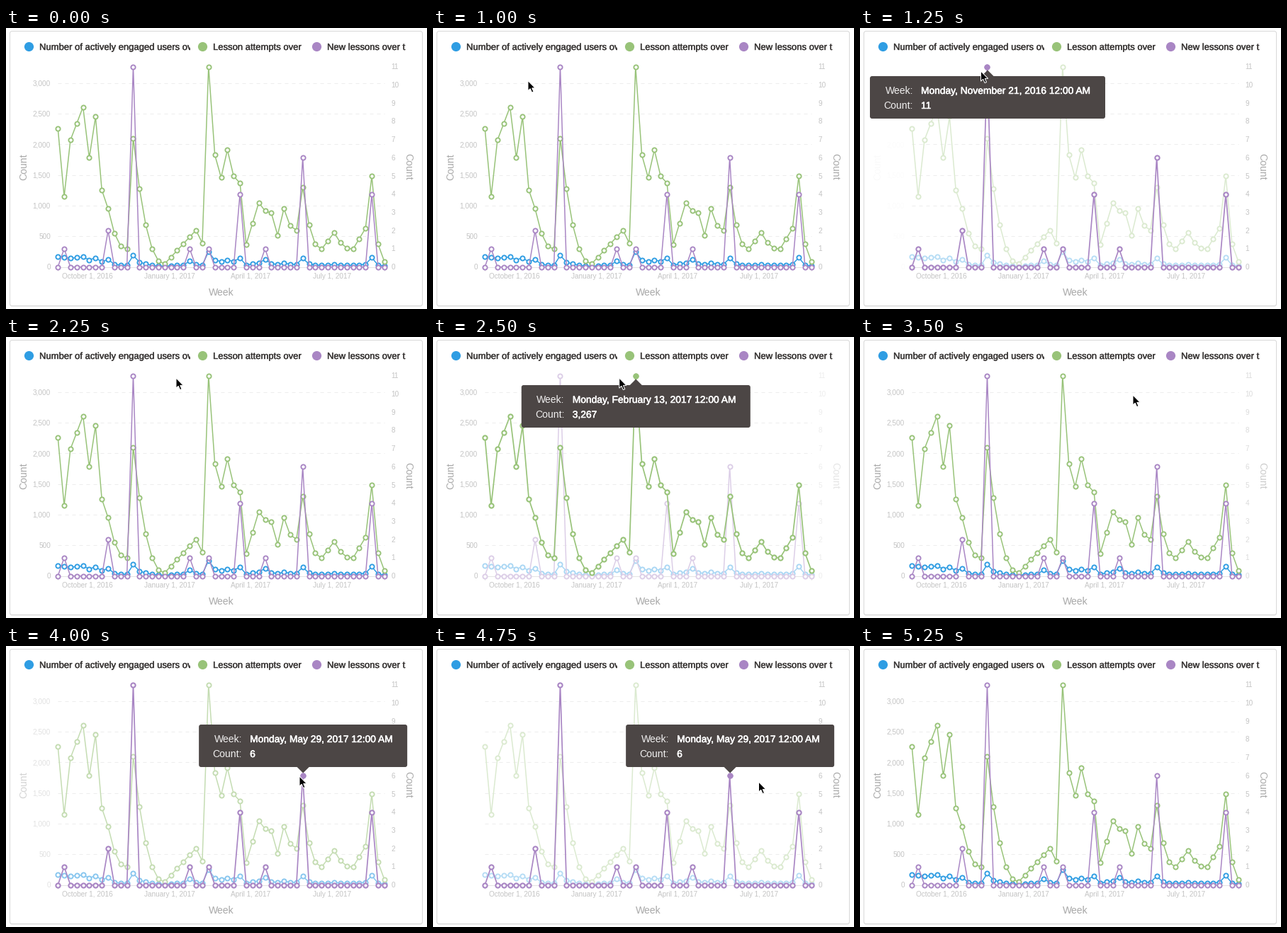
A matplotlib script for the animation above (5750 ms loop, 594 by 397 pixels).

```python
import numpy as np
import matplotlib.pyplot as plt
from matplotlib.animation import FuncAnimation
from matplotlib.patches import Circle, FancyBboxPatch, Polygon, Rectangle
from matplotlib.patheffects import withStroke

W, H, DPI = 594, 397, 64
PT = 72 / DPI
LEFT, RIGHT, BASE, TOP = 73.2, 533.8, 337.6, 54.7
WEEKS = 53
MAX_COUNT, MAX_NEW = 3267, 11

BLUE, GREEN, PURPLE = "#2f9de3", "#98c379", "#a986c4"
TEXT, TICK, TITLE, DARK = "#3a3736", "#c4c4c4", "#a9a9a9", "#4c4645"

# weeks with new lessons, and turning points of lesson attempts (in tens)
NEW = {1: 1, 8: 2, 12: 11, 21: 1, 24: 1, 29: 4, 33: 1, 39: 6, 50: 4}
TURNS = {0: 226, 1: 115, 2: 207, 4: 261, 5: 178, 6: 245, 8: 95, 11: 29,
         12: 210, 17: 5, 22: 60, 23: 39, 24: 326.7, 26: 146, 27: 191, 29: 137,
         30: 37, 32: 105, 34: 88, 35: 52, 36: 95, 38: 60, 39: 130, 42: 29,
         44: 56, 47: 29, 49: 63, 50: 148, 52: 9}

fig = plt.figure(figsize=(W / DPI, H / DPI), dpi=DPI, facecolor="white")
ax = fig.add_axes([0, 0, 1, 1])
ax.set_xlim(0, W)
ax.set_ylim(H, 0)
ax.axis("off")
plt.rcParams["font.family"] = "Liberation Sans"


def attempts(week):
    """Rises are straight; falls drop fast, then level off."""
    start = max(k for k in TURNS if k <= week)
    end = min(k for k in TURNS if k >= week)
    if start == end:
        return 10 * TURNS[week]
    t = (week - start) / (end - start)
    a, b = TURNS[start], TURNS[end]
    if b < a:
        t = 1 - (1 - t) ** 2.3
    return 10 * (a + (b - a) * t)


def users(week):
    """A share of the attempts, more in weeks with new lessons."""
    return 10 + 0.055 * attempts(week) + 60 * (week in NEW) + 40 * 0.7 ** week


def week_x(week):
    return LEFT + week * (RIGHT - LEFT) / (WEEKS - 1)


def level_y(value, top_value):
    return BASE - value * (BASE - TOP) / top_value


def fade(color, alpha):
    rgb = [int(color[i:i + 2], 16) / 255 for i in (1, 3, 5)]
    return tuple(1 - alpha * (1 - c) for c in rgb)


def label(x, y, s, size, color, heavy=0, **kw):
    t = ax.text(x, y, s, fontsize=size * PT, color=color, **kw)
    if heavy:
        t.set_path_effects([withStroke(linewidth=heavy * PT, foreground=color)])
    return t


def rounded(x, y, w, h, r, **kw):
    return ax.add_patch(FancyBboxPatch(
        (x + r, y + r), w - 2 * r, h - 2 * r,
        boxstyle=f"round,pad={r}", **kw))


def draw_card():
    rounded(5.5, 5.8, 582, 387.5, 3, fc="#eeeeee", ec="#eeeeee", lw=PT)
    rounded(5.5, 4.5, 582, 388, 3, fc="white", ec="#d8d8d8", lw=PT)


def draw_legend():
    items = [(47, 259.5, BLUE, "Number of actively engaged users over time"),
             (292, 418.5, GREEN, "Lesson attempts over time"),
             (453, 563.5, PURPLE, "New lessons over time")]
    for x, end, color, name in items:
        ax.add_patch(Circle((x - 14.5, 26.5), 6.6, fc=color, ec="none"))
        t = label(x, 31, name, 13.05, TEXT, 0.4, clip_on=True)
        t.set_clip_path(Rectangle((x - 2, 10), end - x + 2, 34,
                                  transform=ax.transData))


def draw_x_axis():
    for v in range(500, 3001, 500):
        y = level_y(v, MAX_COUNT)
        ax.plot([LEFT, RIGHT], [y, y], color="#ededed", lw=PT,
                dashes=(5, 5), zorder=1)
    ax.plot([LEFT, LEFT, RIGHT, RIGHT], [343, BASE, BASE, 343],
            color="#e4e4e4", lw=PT, zorder=1)
    dates = [(33, "October 1, 2016"), (125, "January 1, 2017"),
             (215, "April 1, 2017"), (306, "July 1, 2017")]
    for day, name in dates:
        label(week_x(day / 7), 353.8, name, 10, TICK, ha="center")
    label(303.5, 378, "Week", 14, TITLE, ha="center")


def make_y_axes():
    left = [label(63, level_y(v, MAX_COUNT) + 3.6, f"{v:,}", 10, TICK, ha="right")
            for v in range(0, 3001, 500)]
    right = [label(543.5, level_y(v, MAX_NEW) + 3.6, str(v), 10, TICK)
             for v in range(MAX_NEW + 1)]
    mid = dict(ha="center", va="center")
    left.append(label(25, 196, "Count", 14, TITLE, rotation=90, **mid))
    right.append(label(567.7, 196, "Count", 14, TITLE, rotation=270, **mid))
    return {"left": left, "right": right}


class Series:
    def __init__(self, rule, top_value, color, z):
        self.color, self.z = color, z
        self.ys = [level_y(rule(w), top_value) for w in range(WEEKS)]
        xs = [week_x(w) for w in range(WEEKS)]
        self.line, = ax.plot(xs, self.ys, marker="o", ms=6.2 * PT, mfc="white",
                             snap=False)
        self.dot, = ax.plot([], [], "o", ms=8 * PT, color=color, mew=0,
                            snap=False)

    def show(self, alpha, focus=None):
        on = focus is not None
        c = fade(self.color, alpha)
        z = self.z + (5 if on else 0)
        self.line.set(color=c, markeredgecolor=c, zorder=z,
                      linewidth=(1.7 if on else 1.5) * PT,
                      markeredgewidth=(2.1 if on else 1.9) * PT)
        self.dot.set(zorder=z + 0.5, visible=on)
        if on:
            self.dot.set_data([week_x(focus)], [self.ys[focus]])


class Tooltip:
    def __init__(self, week, top, width, date, count, below=True):
        cx = week_x(week) + 0.5
        x = cx - width / 2
        base, tip = (top + 0.5, top - 8.5) if below else (top + 59.5, top + 68.5)
        box = rounded(x, top, width, 60, 3, fc=DARK, ec="none", zorder=20)
        arrow = ax.add_patch(Polygon([(cx - 9, base), (cx, tip), (cx + 9, base)],
                                     fc=DARK, ec="none", zorder=20))
        self.parts = [box, arrow]
        for dy, key, val in [(25, "Week:", date), (46, "Count:", count)]:
            self.parts += [
                label(x + 61, top + dy, key, 14, "#f0efef", ha="right", zorder=21),
                label(x + 72, top + dy, val, 13.8, "#ffffff", 0.5, zorder=21)]

    def show(self, on):
        for p in self.parts:
            p.set_visible(on)


draw_card()
draw_legend()
draw_x_axis()
axes = make_y_axes()
series = {
    "users": Series(users, MAX_COUNT, BLUE, 3),
    "attempts": Series(attempts, MAX_COUNT, GREEN, 4),
    "new": Series(lambda w: NEW.get(w, 0), MAX_NEW, PURPLE, 5),
}
tips = {
    12: Tooltip(12, 68, 332, "Monday, November 21, 2016 12:00 AM", "11"),
    24: Tooltip(24, 68, 323, "Monday, February 13, 2017 12:00 AM", "3,267"),
    39: Tooltip(39, 111, 294, "Monday, May 29, 2017 12:00 AM", "6", below=False),
}
ARROW = np.array([(0, 0), (0, 14.2), (3.2, 11.2), (5.6, 16.6), (8, 15.6),
                  (5.7, 10.4), (10.2, 10.4)])
cursor = ax.add_patch(Polygon(ARROW, fc="black", ec="white", lw=PT, zorder=30))

# pointer path: beat, x, y
PATH = np.array([(1, 31, 81), (2, 38, 94), (3, 97, 88), (5, 170, 61),
                 (7, 171, 61), (9, 239.5, 58), (11, 285, 58), (13, 285, 58),
                 (14, 384.5, 82), (16, 413.5, 184), (18, 410, 187),
                 (19, 459, 192)])
# first beat, last beat, series, week, muted axis,
# fade progress on the first beat, recovery on the beat after the last
HOVERS = [(5, 8, "new", 12, "left", 0.95, 1),
          (10, 13, "attempts", 24, "right", 0.7, 0.6),
          (16, 19, "new", 39, "left", 0.5, 0.8)]


def draw(beat):
    active, focus, side, axis_alpha, muted = None, None, None, 1, 1
    for first, last, name, week, axis, begun, back in HOVERS:
        if first <= beat <= last:
            active, focus, side = name, week, axis
            p = begun if beat == first else 1
            axis_alpha = 1 - p
            muted = 1 - 0.65 * min(1, 1.3 * p)  # lines fade faster than axes
        elif beat == last + 1:
            side, axis_alpha = axis, back

    for key, texts in axes.items():
        for t in texts:
            t.set_alpha(axis_alpha if key == side else 1)
    for name, s in series.items():
        if name == active:
            s.show(1, focus)
        else:
            s.show(muted)
    for week, tip in tips.items():
        tip.show(week == focus)

    beats, xs, ys = PATH.T
    cursor.set_visible(beats[0] <= beat <= beats[-1])
    cursor.set_xy(ARROW + [np.interp(beat, beats, xs) + 0.5,
                           np.interp(beat, beats, ys)])
    return []


anim = FuncAnimation(fig, draw, frames=23, interval=250, repeat=True,
                     repeat_delay=0, init_func=lambda: draw(0))
plt.show()
```
